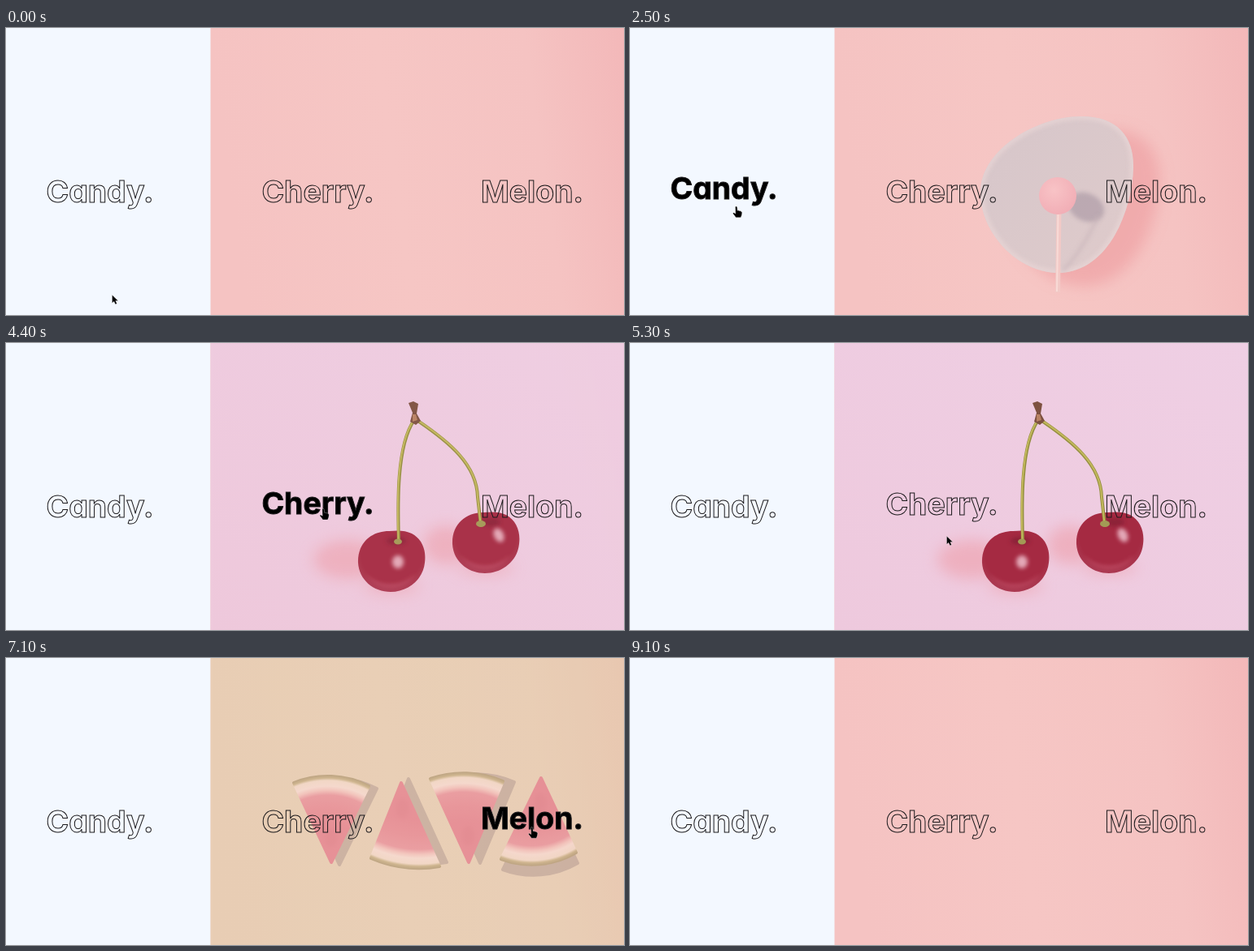
These frames come from a looping animation (760 px wide and 354 px high, 10 s). An HTML page:

```html
<!DOCTYPE html>
<html lang="en">
<head>
<meta charset="utf-8">
<title>Fruit menu</title>
<style>
  html, body { margin: 0; width: 100%; height: 100%; overflow: hidden; background: #f3f8ff; }
  svg { display: block; }
  .word {
    font: 700 37.4px Inter, "Open Sans", sans-serif;
    font-feature-settings: "cv11";
    text-anchor: middle;
    fill: #000; fill-opacity: 0;
    stroke: #1c1a1c; stroke-width: 1;
  }
</style>
</head>
<body>
<svg id="stage" width="760" height="354" viewBox="0 0 760 354">
  <defs>
    <linearGradient id="pink" x1="0" y1=".1" x2="1" y2="0">
      <stop offset="0" stop-color="#f5c3c2"/>
      <stop offset=".4" stop-color="#f6c6c4"/>
      <stop offset=".76" stop-color="#f5c3c2"/>
      <stop offset="1" stop-color="#f3b8b9"/>
    </linearGradient>
    <linearGradient id="lilac" x1="0" y1="1" x2="1" y2="0">
      <stop offset="0" stop-color="#eec9dd"/>
      <stop offset="1" stop-color="#efcfe4"/>
    </linearGradient>
    <linearGradient id="olive">
      <stop offset="0" stop-color="#ddd8a8"/>
      <stop offset=".9" stop-color="#ded9aa"/>
      <stop offset="1" stop-color="#dfd7a9"/>
    </linearGradient>
    <linearGradient id="dish" x1="0" y1="0" x2="1" y2="1">
      <stop offset="0" stop-color="#d6c6ca"/>
      <stop offset="1" stop-color="#dfcbcb"/>
    </linearGradient>
    <radialGradient id="ball" cx=".4" cy=".35" r=".7">
      <stop offset="0" stop-color="#f8c3c6"/>
      <stop offset="1" stop-color="#f1adb5"/>
    </radialGradient>
    <radialGradient id="skin" cx=".5" cy=".4" r=".6">
      <stop offset="0" stop-color="#a52a42"/>
      <stop offset=".75" stop-color="#a52a42"/>
      <stop offset="1" stop-color="#ab3a52"/>
    </radialGradient>
    <filter id="soft" x="-60%" y="-80%" width="220%" height="260%"><feGaussianBlur stdDeviation="9"/></filter>
    <filter id="fuzz" x="-50%" y="-50%" width="200%" height="200%"><feGaussianBlur stdDeviation="2.5"/></filter>
    <path id="plate" d="M431 200C433 150 500 109 555 109C601 109 620 136 619 172C618 222 590 301 527 302C475 302 429 250 431 200Z"/>
    <clipPath id="inPlate"><use href="#plate"/></clipPath>
    <g id="cherry">
      <path fill="url(#skin)" d="M-41 2C-42-22-25-37-3-37C8-38 17-38 25-34C38-27 43-13 41 2C39 23 20 38-1 38C-22 38-40 23-41 2Z"/>
      <ellipse cx="6" cy="-25" rx="12" ry="5" fill="#7b1c30" opacity=".6" filter="url(#fuzz)"/>
      <path d="M-32 15C-18 32 12 34 30 15C20 37-18 41-32 15Z" fill="#d0637a" opacity=".45" filter="url(#fuzz)"/>
    </g>
  </defs>

  <rect width="760" height="354" fill="#f3f8ff"/>
  <rect x="251.5" width="508.5" height="354" fill="url(#pink)"/>

  <g id="candyPic">
    <use href="#plate" x="32" y="16" fill="#efa3a5" opacity=".75" filter="url(#soft)"/>
    <use href="#plate" fill="url(#dish)"/>
    <g clip-path="url(#inPlate)">
      <use href="#plate" fill="none" stroke="#e8d5d5" stroke-width="9" opacity=".7" filter="url(#fuzz)"/>
      <ellipse cx="561" cy="221" rx="23" ry="17" fill="#ae9ca7" opacity=".7" transform="rotate(25 561 221)" filter="url(#fuzz)"/>
      <path d="M576 232Q556 275 532 300" fill="none" stroke="#c8b4b9" stroke-width="4" opacity=".6" filter="url(#fuzz)"/>
    </g>
    <path d="M527.5 226L526 326" stroke="#f2c9c6" stroke-width="6"/>
    <path d="M526.5 228L525 325" stroke="#f8dad6" stroke-width="2"/>
    <circle cx="526" cy="207" r="23" fill="url(#ball)"/>
  </g>

  <g id="cherryPic">
    <rect x="251.5" width="508.5" height="354" fill="url(#lilac)"/>
    <g fill="#ee9faa" opacity=".6" filter="url(#soft)">
      <ellipse cx="420" cy="267" rx="42" ry="24"/>
      <ellipse cx="541" cy="249" rx="28" ry="24"/>
      <ellipse cx="474" cy="300" rx="34" ry="9"/>
      <ellipse cx="590" cy="277" rx="34" ry="8"/>
    </g>
    <use href="#cherry" x="474" y="269"/>
    <use href="#cherry" x="590" y="246"/>
    <g fill="#f3c8d4" opacity=".8" filter="url(#fuzz)">
      <ellipse cx="482" cy="270" rx="7" ry="8"/>
      <ellipse cx="606" cy="237" rx="6" ry="9" transform="rotate(-25 606 237)"/>
    </g>
    <g fill="none" stroke-linecap="round">
      <g stroke="#948f40" stroke-width="4">
        <path d="M483 246C482 206 479 128 502 95"/>
        <path d="M505 95C545 122 579 150 580 190L584 225"/>
      </g>
      <g stroke="#c3b85c" stroke-width="2">
        <path d="M482.500 244C481.500 206 478.500 128 501.500 95"/>
        <path d="M505 94.500C545 121.500 579 149 580 190L583.500 223"/>
      </g>
    </g>
    <ellipse cx="482" cy="245" rx="5" ry="3.500" fill="#a39a55"/>
    <ellipse cx="584" cy="223" rx="6" ry="4" fill="#a39a55"/>
    <path fill="#7d5140" d="M495 74L501 72L507 75L505 87L510 96L504 101L497 97L500 86Z"/>
    <path fill="#b98263" d="M500 88L504 88L506 95L500 97Z"/>
  </g>

  <g id="melonPic">
    <rect x="251.5" width="508.5" height="354" fill="url(#olive)"/>
  </g>

  <text class="word" x="115.500">Candy.</text>
  <text class="word" x="383.500">Cherry.</text>
  <text class="word" x="647">Melon.</text>

  <g id="pointer" stroke="#fff" stroke-width=".5" stroke-opacity=".6">
    <path id="arrow" d="M-.5 .3V10.300L1.800 8.200L3.500 11.800L5.400 10.900L3.800 7.500H6.900Z"/>
    <path id="hand" d="M-1.500 1.200Q-1.500 0 -.5 0Q.6 0 .8 1.200L1.300 5.200Q3 4.400 3.600 5.700Q5.200 5 5.600 6.400Q7 6.200 6.800 8Q6.700 11 5.200 13.700H-.8Q-2.300 11.500 -4.300 9.100Q-4.800 7.800 -3.500 7.700L-1.200 9Z"/>
  </g>
</svg>

<script>
const LOOP = 10000, STEP = 100, LIFT = 4, BASELINE = 215;
const $ = id => document.getElementById(id);

function add(parent, tag, attrs) {
  const el = document.createElementNS("http://www.w3.org/2000/svg", tag);
  for (const k in attrs) el.setAttribute(k, attrs[k]);
  return parent.appendChild(el);
}

// Tip, two rind corners (clockwise), rind radius, shadow offset
const slices = [
  { tip: [400, 252], a: [354, 154], b: [446, 158], r: 112, shade: [10, 3] },
  { tip: [486, 154], a: [533, 257], b: [449, 247], r: 150, shade: [9, -5] },
  { tip: [569, 252], a: [522, 149], b: [611, 152], r: 125, shade: [14, 1] },
  { tip: [658, 148], a: [701, 240], b: [609, 248], r: 108, shade: [2, 13] }
];
// Colour by depth in pixels below the rind
const rind = [[60, "#d95f6c"], [40, "#dc6a74"], [24, "#df7880"], [18, "#f0c3b5"],
              [13, "#f5ecd6"], [6, "#efe9c8"], [3, "#a9a75c"], [0, "#8c8b48"]];

slices.forEach(({ tip, a, b, r, shade }, i) => {
  const pic = $("melonPic");
  const dx = b[0] - a[0], dy = b[1] - a[1], d = Math.hypot(dx, dy);
  const h = Math.sqrt(r * r - d * d / 4);
  const cx = (a[0] + b[0]) / 2 - dy / d * h, cy = (a[1] + b[1]) / 2 + dx / d * h;
  const grad = add(pic, "radialGradient", { id: "rind" + i, gradientUnits: "userSpaceOnUse", cx, cy, r: r + 1 });
  rind.forEach(([depth, color]) => add(grad, "stop", { offset: 1 - depth / r, "stop-color": color }));
  const wedge = (paint, shift) => add(pic, "path", {
    d: `M${tip}L${a}A${r} ${r} 0 0 1 ${b}Z`, fill: paint, stroke: paint,
    "stroke-width": 4, "stroke-linejoin": "round", transform: `translate(${shift})`
  });
  wedge("#a5a283", shade);
  wedge(`url(#rind${i})`, [0, 0]);
  // Darker flesh near the tip
  const mx = tip[0] * .68 + (a[0] + b[0]) * .16, my = tip[1] * .68 + (a[1] + b[1]) * .16;
  add(pic, "ellipse", { cx: mx, cy: my, rx: 8, ry: 12, fill: "#c84858", opacity: .35, filter: "url(#fuzz)" });
});

// Times: image in, image out, word up, word down; hover: start, end
const items = [
  { pic: "candyPic", fade: [1400, 1800, 2600, 3200], lift: [1400, 1700, 2600, 2900], hover: [1500, 2600] },
  { pic: "cherryPic", fade: [3800, 4500, 5300, 5900], lift: [3800, 4100, 5200, 5600], hover: [3900, 5200] },
  { pic: "melonPic", fade: [6800, 7400, 8100, 8700], lift: [6800, 7100, 7900, 8200], hover: [6900, 7900] }
];
const route = [
  [0, 131, 329], [300, 131, 329], [600, 118, 314], [900, 136, 284], [1100, 155, 264],
  [1400, 146, 246], [1500, 138, 224], [1800, 131, 217], [2300, 128, 214], [2500, 131, 220],
  [2700, 165, 238], [3100, 270, 266], [3500, 341, 276], [3700, 352, 262], [3900, 372, 215],
  [4200, 392, 203], [4700, 388, 206], [5000, 386, 210], [5100, 386, 210], [5200, 388, 222],
  [5300, 390, 238], [5600, 480, 262], [6000, 600, 270], [6300, 649, 266], [6700, 658, 240],
  [6900, 654, 212], [7300, 640, 205], [7700, 632, 210], [7900, 622, 232], [8100, 607, 294],
  [8400, 590, 320], [8700, 580, 360], [10000, 580, 360]
];
const words = document.querySelectorAll(".word");

const clamp = v => Math.max(0, Math.min(1, v));
const ease = v => v * v * (3 - 2 * v);
const ramp = (t, from, to) => ease(clamp((t - from) / (to - from)));
const pulse = (t, [a, b, c, d]) => ramp(t, a, b) - ramp(t, c, d);

function place(t) {
  const i = route.findIndex(p => p[0] > t);
  const [t0, x0, y0] = route[i - 1], [t1, x1, y1] = route[i];
  const k = (t - t0) / (t1 - t0);
  return [x0 + (x1 - x0) * k, y0 + (y1 - y0) * k];
}

function draw(t) {
  let over = false;
  items.forEach(({ pic, fade, lift, hover }, i) => {
    const on = t >= hover[0] && t < hover[1];
    over = over || on;
    $(pic).setAttribute("opacity", pulse(t, fade));
    words[i].setAttribute("y", BASELINE - LIFT * pulse(t, lift));
    words[i].style.fillOpacity = on ? 1 : 0;
  });
  $("pointer").setAttribute("transform", `translate(${place(t)})`);
  $("arrow").style.display = over ? "none" : "";
  $("hand").style.display = over ? "" : "none";
}

const start = performance.now();
function tick() {
  const t = (performance.now() - start) % LOOP;
  draw(Math.floor(t / STEP) * STEP);
  requestAnimationFrame(tick);
}
tick();
</script>
</body>
</html>
```
